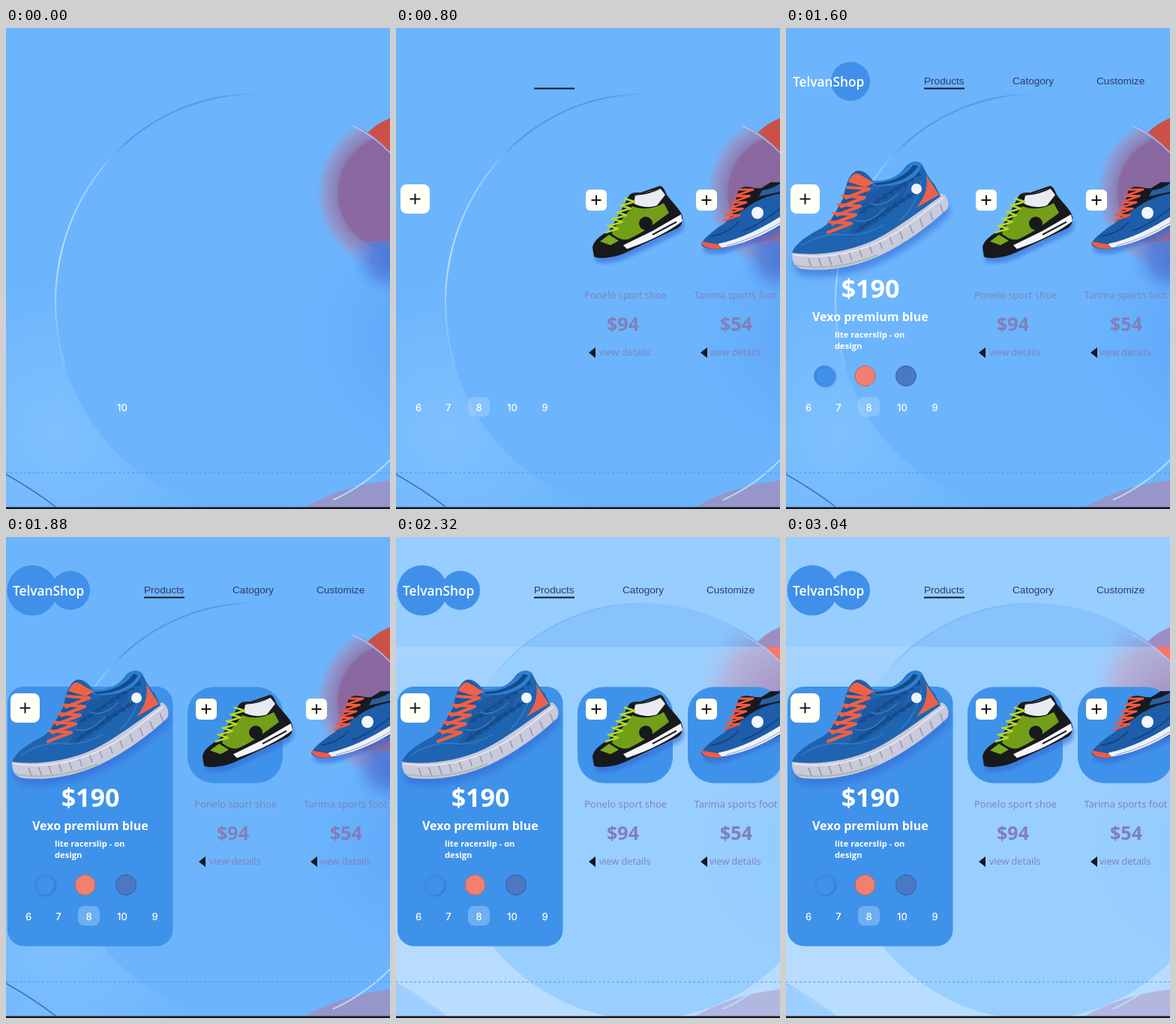
Animation, 512 px wide and 640 px high, one loop 3080 ms. Source, as an HTML page with a canvas:

```html
<!DOCTYPE html>
<html lang="en">
<head>
<meta charset="utf-8">
<title>Shoe shop</title>
<style>
html, body { margin: 0; width: 100%; height: 100%; overflow: hidden; background: #6cb5fd; }
canvas { display: block; width: 512px; height: 640px; }
</style>
</head>
<body>
<canvas id="stage" width="512" height="640"></canvas>
<script>
const ctx = document.getElementById('stage').getContext('2d');
const LOOP = 3080, STEP = 40, TAU = Math.PI * 2;
const SANS = '"Open Sans", "Noto Sans", sans-serif';
const NAV = '"Liberation Sans", Arial, sans-serif';
const DIGIT = 'Inter, Roboto, sans-serif';
const BASE = '#6cb5fd', BLUE = '#3f92e9', MAUVE = '#817fb9', INK = '#121a28';

function fill(color, d) {
  ctx.fillStyle = color;
  ctx.fill(new Path2D(d));
}
function line(color, width, d) {
  ctx.strokeStyle = color;
  ctx.lineWidth = width;
  ctx.stroke(new Path2D(d));
}
function disc(x, y, r, color, edge) {
  ctx.beginPath();
  ctx.arc(x, y, r, 0, TAU);
  ctx.fillStyle = color;
  ctx.fill();
  if (edge) {
    ctx.strokeStyle = edge;
    ctx.lineWidth = 1;
    ctx.stroke();
  }
}
function box(x, y, w, h, r, color) {
  ctx.beginPath();
  ctx.roundRect(x, y, w, h, r);
  ctx.fillStyle = color;
  ctx.fill();
}
function text(str, x, y, font, color = '#fff', align = 'left') {
  ctx.font = font;
  ctx.fillStyle = color;
  ctx.textAlign = align;
  ctx.fillText(str, x, y);
}
function gradient(g, ...stops) {
  stops.forEach(([at, color]) => g.addColorStop(at, color));
  return g;
}
// soft round patch, clipped to the given rectangle
function glow(x, y, r0, r1, rect, ...stops) {
  ctx.fillStyle = gradient(ctx.createRadialGradient(x, y, r0, x, y, r1), ...stops);
  ctx.fillRect(...rect);
}
function withShadow(draw, blur = 5, dy = 7) {
  ctx.save();
  ctx.shadowColor = 'rgba(50,105,215,.6)';
  ctx.shadowBlur = blur;
  ctx.shadowOffsetX = 2;
  ctx.shadowOffsetY = dy;
  draw();
  ctx.restore();
}
function plus(x, y, half, arm) {
  box(x - half, y - half, half * 2, half * 2, half * .42, '#fffff5');
  line(INK, 2, `M${x - arm} ${y}H${x + arm}M${x} ${y - arm}V${y + arm}`);
}
function laces(x, y, dx, dy, shape, width, color) {
  ctx.lineCap = ctx.lineJoin = 'round';
  for (let i = 0; i < 5; i++) line(color, width, `M${x - i * dx} ${y + i * dy}${shape}`);
  ctx.lineCap = 'butt';
  ctx.lineJoin = 'miter';
}

function bigRound() {
  ctx.beginPath();
  ctx.ellipse(330, 365, 264, 277, 0, 0, TAU);
}

function backdrop(t) {
  const pale = t >= 2320, header = t >= 2080;
  ctx.fillStyle = BASE;
  ctx.fillRect(0, 0, 512, 640);
  if (pale) {
    ctx.fillStyle = gradient(ctx.createLinearGradient(0, 146, 0, 640),
      [0, '#a7d4ff'], [.2, '#9ed0ff'], [.7, '#b4daff'], [1, '#b9ddff']);
    ctx.fillRect(0, 146, 512, 494);
  } else {
    glow(70, 540, 0, 200, [0, 300, 280, 340], [0, 'rgba(140,200,255,.6)'], [1, 'rgba(140,200,255,0)']);
  }
  disc(540, 196, 81, pale ? '#fb7763' : header ? '#ed5c4b' : '#cd5048');

  ctx.save();
  bigRound();
  ctx.clip();
  ctx.fillStyle = pale ? '#99cfff' : BASE;
  ctx.fillRect(0, 0, 512, 640);
  glow(560, 410, 0, 170, [390, 240, 122, 340],
    [0, `rgba(75,145,243,${pale ? .08 : .4})`], [1, 'rgba(75,145,243,0)']);
  if (pale) {
    glow(520, 215, 20, 122, [390, 90, 122, 250],
      [0, '#a898c8'], [.6, '#b2b4dc'], [1, 'rgba(165,200,245,0)']);
  } else {
    glow(520, 219, 60, 107, [400, 90, 112, 250],
      [0, '#88689f'], [.34, '#89699f'], [.42, '#8b80b8'], [.75, '#8c9bd4'], [.9, 'rgba(130,165,225,.6)'], [1, 'rgba(108,181,253,0)']);
    glow(512, 306, 6, 52, [440, 284, 72, 76],
      [0, '#4f7bd8'], [.4, 'rgba(82,128,222,.85)'], [1, 'rgba(90,155,243,0)']);
  }
  ctx.restore();

  if (header) {
    ctx.save();
    ctx.beginPath();
    ctx.rect(0, 0, 512, 146);
    ctx.clip();
    ctx.fillStyle = pale ? '#98cdff' : BASE;
    ctx.fillRect(0, 0, 512, 146);
    disc(540, 196, 81, pale ? '#9e8dc3' : '#9082be');
    bigRound();
    ctx.fillStyle = pale ? '#88c3fc' : '#6bb3fb';
    ctx.fill();
    ctx.fillStyle = gradient(ctx.createRadialGradient(510, 200, 40, 510, 200, 105),
      [0, '#9089c5'], [1, 'rgba(135,165,230,0)']);
    ctx.fill();
    ctx.restore();
    if (!pale) line('rgba(70,130,220,.5)', 1, 'M275 145.5H512');
  }

  const rim = pale ? .35 : 1;
  ctx.save();
  ctx.beginPath();
  ctx.rect(0, 0, 390, 450);
  ctx.clip();
  bigRound();
  ctx.lineWidth = 2;
  ctx.strokeStyle = gradient(ctx.createLinearGradient(70, 420, 340, 88),
    [0, `rgba(180,220,255,${rim * .3})`], [.2, `rgba(190,225,255,${rim})`],
    [.5, `rgba(165,210,255,${rim * .8})`], [.62, `rgba(65,145,230,${rim * .8})`],
    [.9, `rgba(65,145,230,${rim * .7})`], [1, 'rgba(65,145,230,0)']);
  ctx.stroke();
  ctx.restore();
  line(`rgba(190,215,250,${pale ? .5 : .7})`, 1.5, 'M462 130Q490 143 512 166');

  fill(pale ? '#b2b7df' : '#9696ca', 'M398 638Q448 609 512 602V638Z');
  line('rgba(190,224,255,.85)', 2, 'M436 628Q478 609 512 575');
  if (pale) fill('#9ccfff', 'M0 594L66 638H0Z');
  line(pale ? 'rgba(100,160,230,.35)' : header ? '#518ddd' : '#3f66bd', 1.5, 'M0 594Q34 613 66 637');
  ctx.setLineDash([3, 3]);
  line('#4b96ee', 1.2, 'M0 592H512');
  ctx.setLineDash([]);
  ctx.fillStyle = '#111722';
  ctx.fillRect(0, 637.5, 512, 2.5);
}

function blueShoe() {
  withShadow(() => fill('#c9cada',
    'M8 298C7 310 12 320 24 321C60 324 90 318 125 303C160 286 190 264 215 241C219 233 215 224 208 220L190 230C150 260 110 286 70 296Z'), 8, 9);
  fill('#1f64b0',
    'M8 299C12 287 28 276 48 266C62 257 66 244 76 227C80 208 84 194 94 190C104 188 110 196 116 203C136 206 152 196 160 184C166 177 176 177 181 181C186 190 190 200 198 208L206 224C180 242 150 266 118 282C85 298 40 304 8 299Z');
  fill('#1c5aa3', 'M108 222C126 208 150 207 165 202C160 226 142 246 113 265L82 280C90 264 96 240 108 222Z');
  // mesh patches
  for (let i = 0; i < 9; i++) {
    const x = 92 + i * 9, y = 272 - i * 6;
    fill('#174c8b', `M${x} ${y}l9 -11l5 6ZM${x + 4} ${y - 25}l10 -9l2 7Z`);
  }
  fill('#2c7fd3', 'M112 203C138 206 156 194 166 179Q175 175 181 181C178 201 150 213 118 210Z');
  fill('#164a88', 'M117 206C142 206 160 196 170 182L176 184C168 198 148 208 120 209Z');
  line('#347dc9', 1.4, 'M20 290Q48 272 76 275T130 262M92 256Q112 262 132 239M112 233Q130 240 150 220M152 256Q173 239 181 202');
  fill('#e8624f', 'M187 196L204 222L174 239C184 226 190 214 187 196Z');
  fill('#1b569c', 'M77 226C82 202 90 188 99 192L116 206L106 222L70 262L57 261Z');
  fill('#ee6248', 'M83 205C87 195 93 191 99 195L117 206L106 212Z');
  laces(82, 212, 6, 11.5, 'l29 2l-31 12', 4.2, '#ee6045');
  for (let i = 0; i < 14; i++) {
    const x = 30 + i * 13.5, y = 307 - Math.pow(i / 13, 1.8) * 72;
    line('#8e91b2', 1.4, `M${x} ${y}l4 11`);
  }
  line('#e9e9f2', 1.6, 'M10 302C65 309 109 295 146 273C171 258 190 239 210 226');
  line('#a8bba9', 2, 'M13 316C48 322 84 317 122 302');
  disc(174, 214, 7, '#f2f5fa');
}

function greenShoe() {
  withShadow(() => fill('#17191c',
    'M262 292C263 284 272 276 284 270C292 258 302 240 310 224C314 218 320 219 326 219L352 210C357 211 358 216 361 222C368 232 374 236 380 246C384 254 382 262 376 266L306 299C292 306 268 308 264 304Z'));
  fill('#739f18', 'M290 267C300 256 309 246 315 237C330 243 345 240 357 233L364 246C345 260 330 272 312 280C304 284 296 280 288 274Z');
  fill('#7ca81f', 'M272 284L284 275L297 283L286 289Z');
  fill('#e9ebf3', 'M319 223L352 213L359 222L348 236C338 240 324 238 317 233Z');
  line('#23262a', 2.5, 'M316 221Q333 223 354 212');
  fill('#f5f5f9', 'M303 289L342 270L380 248L382 257C365 270 340 283 308 294Z');
  line('#25282b', 2, 'M342 275L374 258');
  laces(305, 227, 5.5, 9, 'l13 4l-16 5', 2.8, '#b5d92c');
  disc(333, 260, 9, '#17191c');
}

function racerShoe() {
  withShadow(() => fill('#1d5da9',
    'M407 287C412 278 425 268 438 260C450 250 455 230 460 214C468 208 480 216 490 214L500 206L514 204V264L440 292C425 296 408 294 407 287Z'));
  fill('#171a21', 'M457 215C466 207 477 215 487 213L500 205L514 206V220C496 222 478 231 466 240L446 254Z');
  fill('#28609f', 'M488 216Q502 214 512 207V218Q498 221 484 224Z');
  fill('#f0f1f7', 'M430 287C460 281 490 265 514 250V261C490 276 460 289 430 293Z');
  line('#8ea0c0', 1, 'M440 290Q479 280 514 258');
  fill('#ef5c45', 'M407 284L430 288L435 293C422 295 408 293 407 284Z');
  line('#123e7c', 1.5, 'M420 277Q442 274 457 258M462 270Q485 262 512 240');
  laces(458, 215, 4.5, 8.5, 'l18 0l-20 7', 2.8, '#f0593f');
  disc(482, 246, 8, '#f2f5fa');
}

const digit = (str, x) => () => text(str, x, 510, `500 13px ${DIGIT}`, '#fff', 'center');
const nav = (str, x) => () => text(str, x, 75, `13.6px ${NAV}`, '#30396c');
const label = (str, x) => () => text(str, x, 360, `13px ${SANS}`, MAUVE, 'center');
const price = (str, x) => () => text(str, x, 403, `700 25px ${SANS}`, MAUVE, 'center');
const details = x => () => text('view details', x, 436, `12.7px ${SANS}`, MAUVE);
const arrow = x => () => fill('#101923', `M${x} 432l9 -7v14Z`);

// [time of appearance, draw], listed from back to front
const layers = [
  [1640, () => disc(35, 71, 33.5, '#4090ea')],
  [1560, () => disc(86, 71, 26, '#4090ea')],
  [1760, () => box(2, 199, 220.5, 345.5, 22, BLUE)],
  [1840, () => box(242, 199.5, 127, 128, 35, BLUE)],
  [1920, () => box(389, 199.5, 127, 128, 35, BLUE)],
  [1240, blueShoe],
  [600, greenShoe],
  [560, racerShoe],
  [720, () => plus(25.5, 227.5, 19.5, 7)],
  [680, () => plus(267, 229, 14, 6.5)],
  [640, () => plus(414, 229, 14, 6.5)],
  [520, label('Ponelo sport shoe', 306)],
  [400, label('Tarima sports foot', 453)],
  [480, price('$94', 302.5)],
  [360, price('$54', 453.5)],
  [440, details(271)],
  [320, details(418)],
  [440, arrow(257)],
  [280, arrow(406)],
  [760, () => { ctx.fillStyle = INK; ctx.fillRect(184, 79.5, 54, 2); }],
  [1520, () => text('TelvanShop', 9, 78, `600 17.3px ${SANS}`)],
  [1440, nav('Products', 184)],
  [1400, nav('Catogory', 302)],
  [1320, nav('Customize', 414)],
  [1160, () => text('$190', 112.5, 358.5, `700 34px ${SANS}`, '#fff', 'center')],
  [1080, () => text('Vexo premium blue', 35, 390, `700 16px ${SANS}`)],
  [1000, () => {
    text('lite racerslip - on', 65, 412, `700 11.2px ${SANS}`);
    text('design', 65, 427, `700 11.2px ${SANS}`);
  }],
  [920, () => withShadow(() => disc(51, 463, 13.5, '#3e92ea', '#4489de'), 2, 1)],
  [880, () => disc(105.5, 463, 13.5, '#f1806f', '#b5646f')],
  [840, () => disc(160, 463, 13.5, '#4b78c2', '#345da5')],
  [240, () => box(96, 491, 29, 26, 8, 'rgba(175,218,255,.42)')],
  [200, digit('6', 30)],
  [160, digit('7', 70)],
  [120, digit('8', 110.5)],
  [0, digit('10', 155)],
  [80, digit('9', 198.5)]
];

function draw(now) {
  const t = Math.floor((now % LOOP) / STEP) * STEP;
  backdrop(t);
  for (const [at, paint] of layers) if (t >= at) paint();
}

let start;
function tick(now) {
  start ??= now;
  draw(Math.max(0, now - start));
  requestAnimationFrame(tick);
}
draw(0);
requestAnimationFrame(tick);
</script>
</body>
</html>
```
